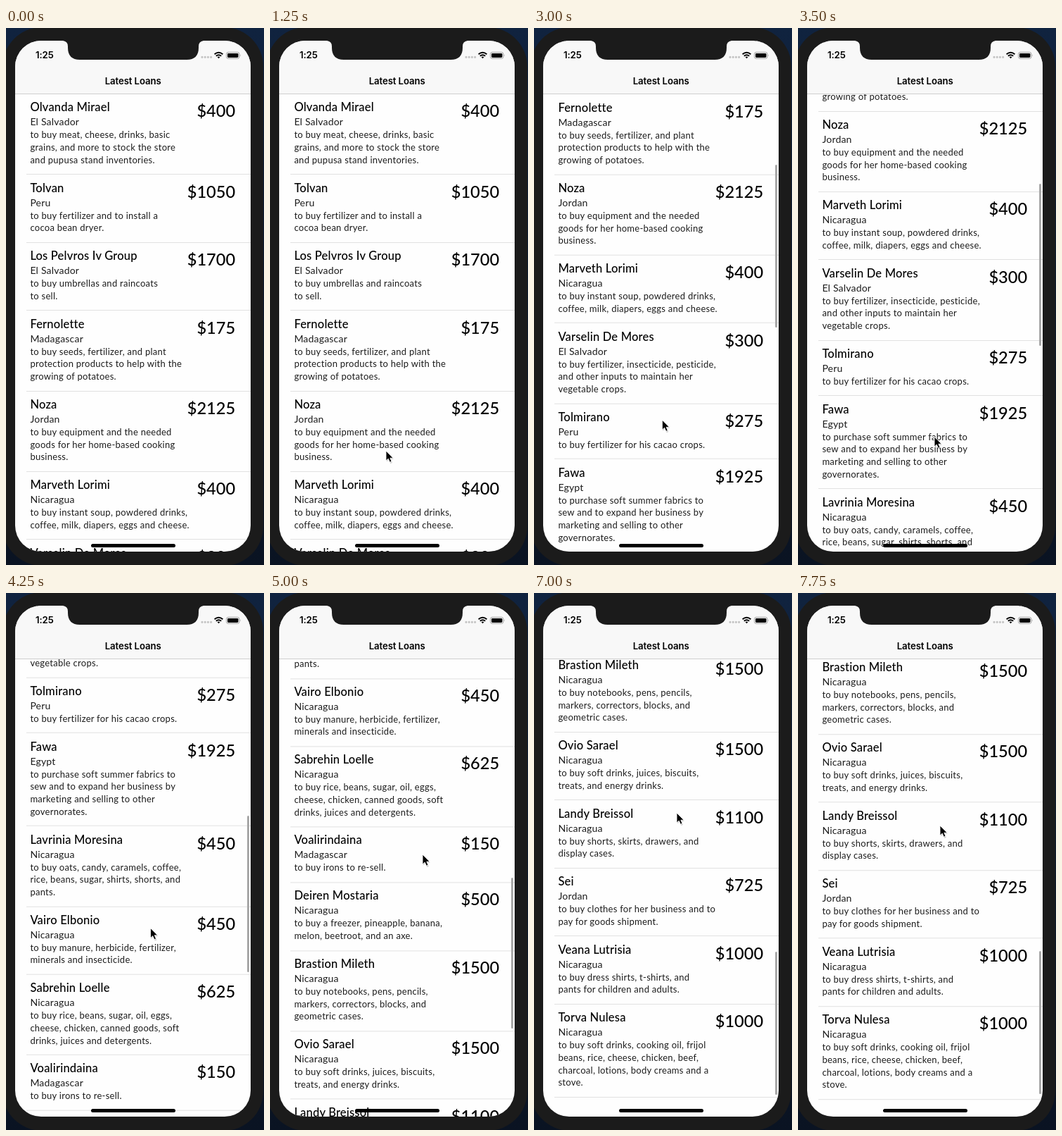
Animation, 367 px wide and 762 px high, one loop 8000 ms. Source, as an HTML page:

```html
<!DOCTYPE html>
<html lang="en">
<head>
<meta charset="utf-8">
<title>Latest Loans</title>
<style>
  html, body { margin: 0; width: 100%; height: 100%; overflow: hidden; background: #0b1626; }
  #stage { position: absolute; left: 0; top: 0; width: 367px; height: 762px; overflow: hidden;
    background: linear-gradient(#10233f, #0a1322); }
  #stage div, #stage svg { position: absolute; }
  #stage .phone { left: -5px; top: -1px; width: 371px; height: 764px; border-radius: 56px; background: #1b1b1b; }
  #stage .screen { left: 13.2px; top: 18px; width: 335px; height: 725px; border-radius: 37px;
    overflow: hidden; background: #fefefe; color: #000; }
  #list { left: 0; top: 76.2px; width: 335px; font-family: Lato, "Open Sans", sans-serif; }
  #list .row { position: relative; box-sizing: border-box; padding: 8.2px 0 12px 21.2px; }
  .row::after { content: ""; position: absolute; left: 16px; right: 0; bottom: 0; height: 1px; background: #e1e1e1; }
  .row h2, .row h3, .row p { margin: 0; white-space: pre; }
  .row h2 { font-size: 16.5px; font-weight: 500; line-height: 20px; letter-spacing: .2px; }
  .row h3 { margin-top: 2px; font-size: 14px; font-weight: 400; line-height: 18px; letter-spacing: .2px; color: #1c1c1c; }
  .row p { margin-top: 1px; font-size: 13px; line-height: 17.667px; letter-spacing: .27px; color: #1c1c1c; }
  .row b { position: absolute; right: 22px; top: 9.2px; font-size: 23.6px; font-weight: 500; line-height: 28px; }
  #stage .bar { left: 0; top: 0; width: 335px; height: 75px; background: #f8f8f8; border-bottom: 1px solid #cfcfcf;
    font: 600 13.2px/16px Inter, sans-serif; letter-spacing: -.1px; }
  #stage .title { left: 0; top: 49.2px; width: 335px; text-align: center; }
  #stage .clock { left: 28.8px; top: 12.4px; }
  #thumb { left: 329.8px; width: 2.7px; border-radius: 2px; background: #a9a9a9; }
  #stage .home { left: 107.8px; top: 714px; width: 120px; height: 4.5px; border-radius: 3px; background: #000; }
  #art { left: 0; top: 0; }
</style>
</head>
<body>
<div id="stage">
  <div class="phone"></div>
  <div class="screen">
    <div id="list"></div>
    <div id="thumb"></div>
    <div class="bar">
      <div class="clock">1:25</div>
      <div class="title">Latest Loans</div>
    </div>
    <div class="home"></div>
  </div>
  <svg id="art" width="367" height="762">
    <path fill="#1b1b1b" d="M81 17H281V18Q274 19 274 26V28Q274 45 257 45H105Q88 45 88 28V26Q88 19 81 18Z"/>
    <path d="M279 41.3H292" stroke="#c4c4c4" stroke-width="3.2" stroke-linecap="round" stroke-dasharray="0 4.2"/>
    <g fill="none" stroke="#000" stroke-width="1.9">
      <path d="M296.6 37.3Q302.5 32 308.4 37.3"/>
      <path d="M298.8 39.8Q302.5 36.5 306.2 39.8"/>
    </g>
    <path d="M300.6 41.3Q302.5 39.8 304.4 41.3L302.5 43.3Z"/>
    <rect x="313.5" y="34.4" width="18.4" height="9" rx="2.5" fill="none" stroke="#999" stroke-width=".9"/>
    <rect x="315" y="35.9" width="15.4" height="6" rx="1.3"/>
    <path fill="#999" d="M332.9 37.3Q334.3 38.9 332.9 40.5Z"/>
    <g id="cursor">
      <path d="M1 2V17L4.5 14L7 20L10 19L7.4 13H12Z" opacity=".18"/>
      <path d="M0 0V15.6L3.6 12.4L6.1 18L8.9 16.8L6.5 11.4H11.4Z" stroke="#fff" stroke-linejoin="round"/>
    </g>
  </svg>
</div>
<script>
const LOOP = 8000, TICK = 250, MAX_SCROLL = 1468;

const loans = [
  ["Olvanda Mirael", "El Salvador", 400, "to buy meat, cheese, drinks, basic\ngrains, and more to stock the store\nand pupusa stand inventories."],
  ["Tolvan", "Peru", 1050, "to buy fertilizer and to install a\ncocoa bean dryer."],
  ["Los Pelvros Iv Group", "El Salvador", 1700, "to buy umbrellas and raincoats\nto sell."],
  ["Fernolette", "Madagascar", 175, "to buy seeds, fertilizer, and plant\nprotection products to help with the\ngrowing of potatoes."],
  ["Noza", "Jordan", 2125, "to buy equipment and the needed\ngoods for her home-based cooking\nbusiness."],
  ["Marveth Lorimi", "Nicaragua", 400, "to buy instant soup, powdered drinks,\ncoffee, milk, diapers, eggs and cheese."],
  ["Varselin De Mores", "El Salvador", 300, "to buy fertilizer, insecticide, pesticide,\nand other inputs to maintain her\nvegetable crops."],
  ["Tolmirano", "Peru", 275, "to buy fertilizer for his cacao crops."],
  ["Fawa", "Egypt", 1925, "to purchase soft summer fabrics to\nsew and to expand her business by\nmarketing and selling to other\ngovernorates."],
  ["Lavrinia Moresina", "Nicaragua", 450, "to buy oats, candy, caramels, coffee,\nrice, beans, sugar, shirts, shorts, and\npants."],
  ["Vairo Elbonio", "Nicaragua", 450, "to buy manure, herbicide, fertilizer,\nminerals and insecticide."],
  ["Sabrehin Loelle", "Nicaragua", 625, "to buy rice, beans, sugar, oil, eggs,\ncheese, chicken, canned goods, soft\ndrinks, juices and detergents."],
  ["Voalirindaina", "Madagascar", 150, "to buy irons to re-sell."],
  ["Deiren Mostaria", "Nicaragua", 500, "to buy a freezer, pineapple, banana,\nmelon, beetroot, and an axe."],
  ["Brastion Mileth", "Nicaragua", 1500, "to buy notebooks, pens, pencils,\nmarkers, correctors, blocks, and\ngeometric cases."],
  ["Ovio Sarael", "Nicaragua", 1500, "to buy soft drinks, juices, biscuits,\ntreats, and energy drinks."],
  ["Landy Breissol", "Nicaragua", 1100, "to buy shorts, skirts, drawers, and\ndisplay cases."],
  ["Sei", "Jordan", 725, "to buy clothes for her business and to\npay for goods shipment."],
  ["Veana Lutrisia", "Nicaragua", 1000, "to buy dress shirts, t-shirts, and\npants for children and adults."],
  ["Torva Nulesa", "Nicaragua", 1000, "to buy soft drinks, cooking oil, frijol\nbeans, rice, cheese, chicken, beef,\ncharcoal, lotions, body creams and a\nstove."]
];

// Stops of the gesture: time, scroll, cursor x, cursor y
const stops = [
  [1250, 0, 165, 600],
  [2000, 51, 149, 488],
  [3500, 397, 194, 580],
  [5000, 1043.6, 217, 371],
  [6000, 1186.7, 208, 497],
  [7000, MAX_SCROLL, 203, 312],
  [7750, 1464.8, 202, 330]
];

const $ = id => document.getElementById(id);
const ease = u => u * u * (3 - 2 * u);

function poseAt(t) {
  const next = stops.findIndex(s => s[0] >= t);
  if (next <= 0) return stops[0];
  const a = stops[next - 1], b = stops[next];
  const k = ease((t - a[0]) / (b[0] - a[0]));
  return a.map((v, i) => v + (b[i] - v) * k);
}

$("list").innerHTML = loans.map(([name, country, sum, use]) =>
  `<div class="row"><h2>${name}</h2><h3>${country}</h3><p>${use}</p><b>$${sum}</b></div>`).join("");

function draw() {
  const now = performance.now() % LOOP;
  const t = Math.floor(now / TICK) * TICK;
  const [, scroll, x, y] = poseAt(t);
  $("list").style.transform = `translateY(${-scroll}px)`;

  // The thumb shrinks as more rows become known
  const p = scroll / MAX_SCROLL;
  const thumb = $("thumb").style;
  thumb.visibility = scroll > 0 ? "visible" : "hidden";
  thumb.top = 77 + 487 * p - 73 * p * p + "px";
  thumb.height = 239 - 36 * p + "px";

  const cursor = $("cursor");
  cursor.style.visibility = t >= stops[0][0] ? "visible" : "hidden";
  cursor.setAttribute("transform", `translate(${x} ${y}) scale(.9)`);
  requestAnimationFrame(draw);
}
draw();
</script>
</body>
</html>
```
